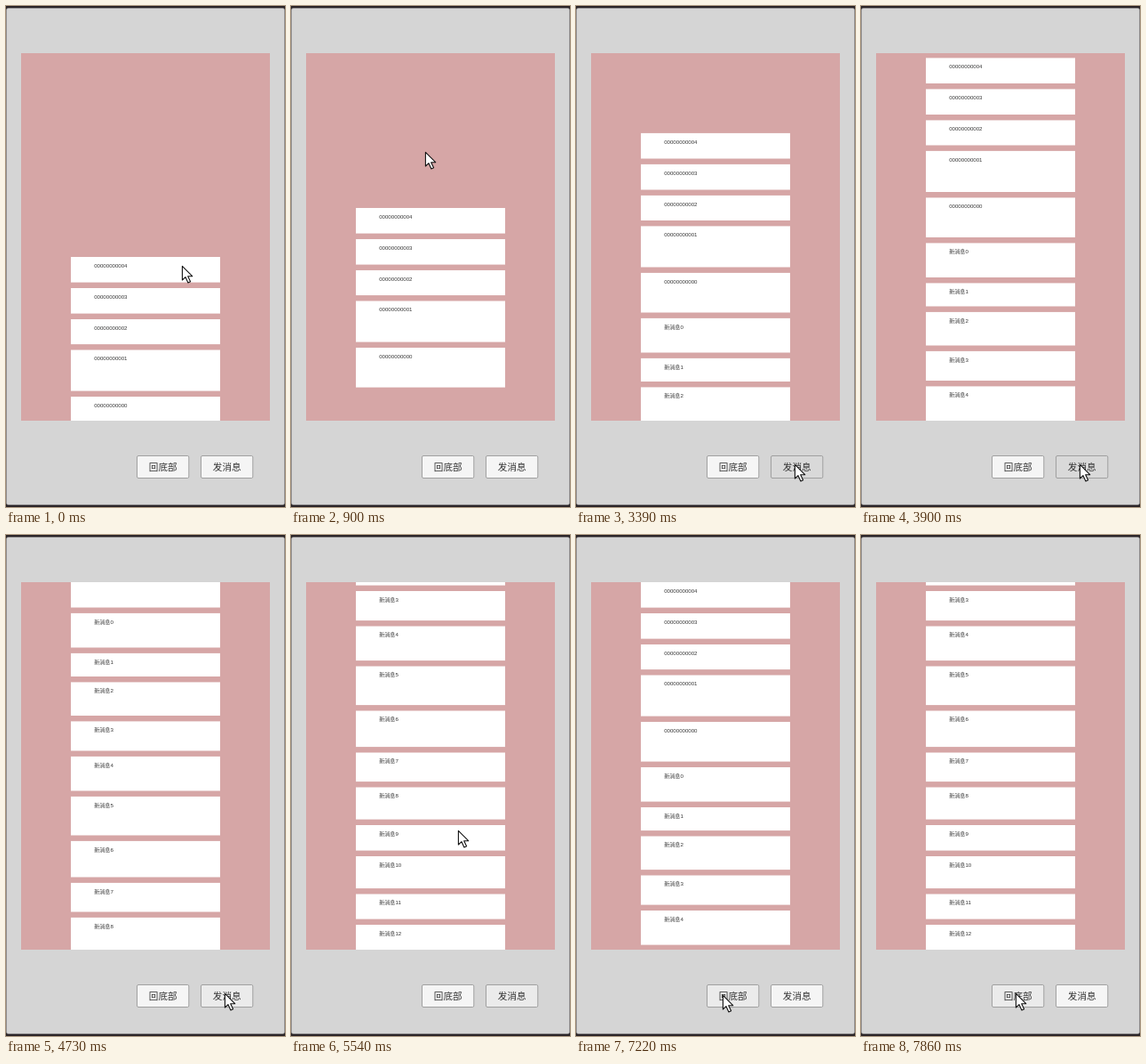
These frames come from a looping animation (314x563 px, 8 s). An HTML page:

```html
<!DOCTYPE html>
<html>
<head>
<meta charset="utf-8">
<title>Message list</title>
<style>
  html, body { margin: 0; width: 100%; height: 100%; overflow: hidden; background: #d5d5d5; }
  svg { display: block; width: 314px; height: 563px; }
  text { font-family: "Liberation Sans", "Noto Sans CJK SC", "Noto Sans CJK", sans-serif; fill: #333; }
  #list text { font-size: 6.1px; }
  .btn rect { fill: #f5f5f5; stroke: #999; stroke-width: .9; }
  .btn.over rect { fill: #ebebeb; }
  .btn.down rect { fill: #d9d9d9; }
  .btn text { font-size: 10.6px; text-anchor: middle; }
</style>
</head>
<body>
<svg viewBox="0 0 314 563">
  <rect width="314" height="563" fill="#2a2427"/>
  <rect x=".5" y="2.5" width="313" height="558" rx="2" fill="#d5d5d5" stroke="#999" stroke-width=".6"/>
  <rect x="17" y="53" width="280" height="413" fill="#d6a6a6"/>
  <clipPath id="view"><rect x="17" y="53" width="280" height="413"/></clipPath>
  <g clip-path="url(#view)"><g id="list"></g></g>
  <g class="btn" id="back">
    <rect x="147.5" y="505.5" width="58.3" height="25" rx="1.5"/>
    <text x="176.7" y="522">回底部</text>
  </g>
  <g class="btn" id="send">
    <rect x="219.5" y="505.5" width="58.3" height="25" rx="1.5"/>
    <text x="248.7" y="522">发消息</text>
  </g>
  <path id="cursor" d="M.4 .4V16L4 12.7L6.9 18.9L9.6 17.7L6.7 11.7H11.7Z" fill="#fff" stroke="#111" stroke-width="1.1" stroke-linejoin="round"/>
</svg>
<script>
(() => {
  // The picture refreshes once per beat; all moments below are counted in beats.
  const LOOP = 8000, BEAT = 131.5, LEAD = 30;
  const BOTTOM = 466, GAP = 6.4, OLD = 5;

  const heights = [28.6, 28.6, 28.1, 46.1, 44.6, 38.6, 26.1, 37.6, 33.1,
    38.6, 43.6, 40.6, 32.6, 36.1, 28.6, 36.1, 28.1, 28];
  const arrivals = [15, 18, 22, 27, 29, 30, 31, 34, 36, 37, 38, 39, 40];
  const sendPresses = [14, 17, 26, 29, 30, 37];

  // Pointer stops: [beat, x, y]
  const stops = [[0, 198, 292], [1, 194, 334], [2, 186, 483], [3, 176, 440], [6, 152, 116],
    [7, 151, 164], [9, 229, 464], [11, 239, 508], [12, 241, 512], [18, 241, 512],
    [21, 246, 515], [40, 246, 515], [42, 188, 332], [46, 184, 497], [48, 188, 340],
    [52, 192, 501], [54, 158, 521], [55, 165, 517], [57, 165, 517], [60, 174, 515]];

  const $ = id => document.getElementById(id);
  const offset = n => heights.slice(0, n).reduce((sum, h) => sum + h + GAP, 0);

  function add(parent, tag, attrs, label = "") {
    const el = document.createElementNS("http://www.w3.org/2000/svg", tag);
    for (const key in attrs) el.setAttribute(key, attrs[key]);
    el.textContent = label;
    return parent.appendChild(el);
  }

  const items = heights.map((height, i) => {
    const g = add($("list"), "g", {});
    const y = offset(i);
    add(g, "rect", { x: 73, y, width: 168, height, fill: "#fff" });
    add(g, "text", { x: 99.2, y: y + 11.7 },
      i < OLD ? "0000000000" + (OLD - 1 - i) : "新消息" + (i - OLD));
    return g;
  });

  function pointer(beat) {
    const next = stops.findIndex(s => s[0] > beat);
    if (next < 0) return stops[stops.length - 1].slice(1);
    const [b0, x0, y0] = stops[next - 1], [b1, x1, y1] = stops[next];
    const p = (beat - b0) / (b1 - b0);
    return [x0 + (x1 - x0) * p, y0 + (y1 - y0) * p];
  }

  // Distance of the list from its resting place at the bottom
  function shift(beat, y) {
    const toTop = BOTTOM - 53 - (offset(heights.length) - GAP);
    if (beat <= 6) return y - 274.4;                  // dragged
    if (beat < 42) {                                  // springs back
      const s = 2.77 * (beat - 6);
      return -158.4 * (1 + s) * Math.exp(-s);
    }
    if (beat <= 46) return y - 332;                   // dragged down
    if (beat <= 57) {                                 // glides to the top
      const left = Math.max(0, (52 - beat) / 6);
      return -toTop - (-toTop - 165) * left ** 2;
    }
    return -toTop * Math.max(0, (59 - beat) / 2) ** 2; // returns to the bottom
  }

  function move(id, x, y) {
    $(id).setAttribute("transform", `translate(${x} ${y})`);
  }

  function setButton(id, over, down) {
    $(id).classList.toggle("over", over);
    $(id).classList.toggle("down", down);
  }

  function draw(time) {
    const beat = Math.floor((time + LEAD) / BEAT);
    const count = OLD + arrivals.filter(b => b <= beat).length;
    const [x, y] = pointer(beat);
    items.forEach((g, i) => g.style.display = i < count ? "" : "none");
    move("list", 0, BOTTOM - (offset(count) - GAP) + shift(beat, y));
    move("cursor", x, y);
    setButton("send", beat >= 14 && beat < 46, sendPresses.includes(beat));
    setButton("back", beat >= 54, beat === 57);
  }

  const start = performance.now();
  function loop() {
    draw((performance.now() - start) % LOOP);
    requestAnimationFrame(loop);
  }
  loop();
})();
</script>
</body>
</html>
```
